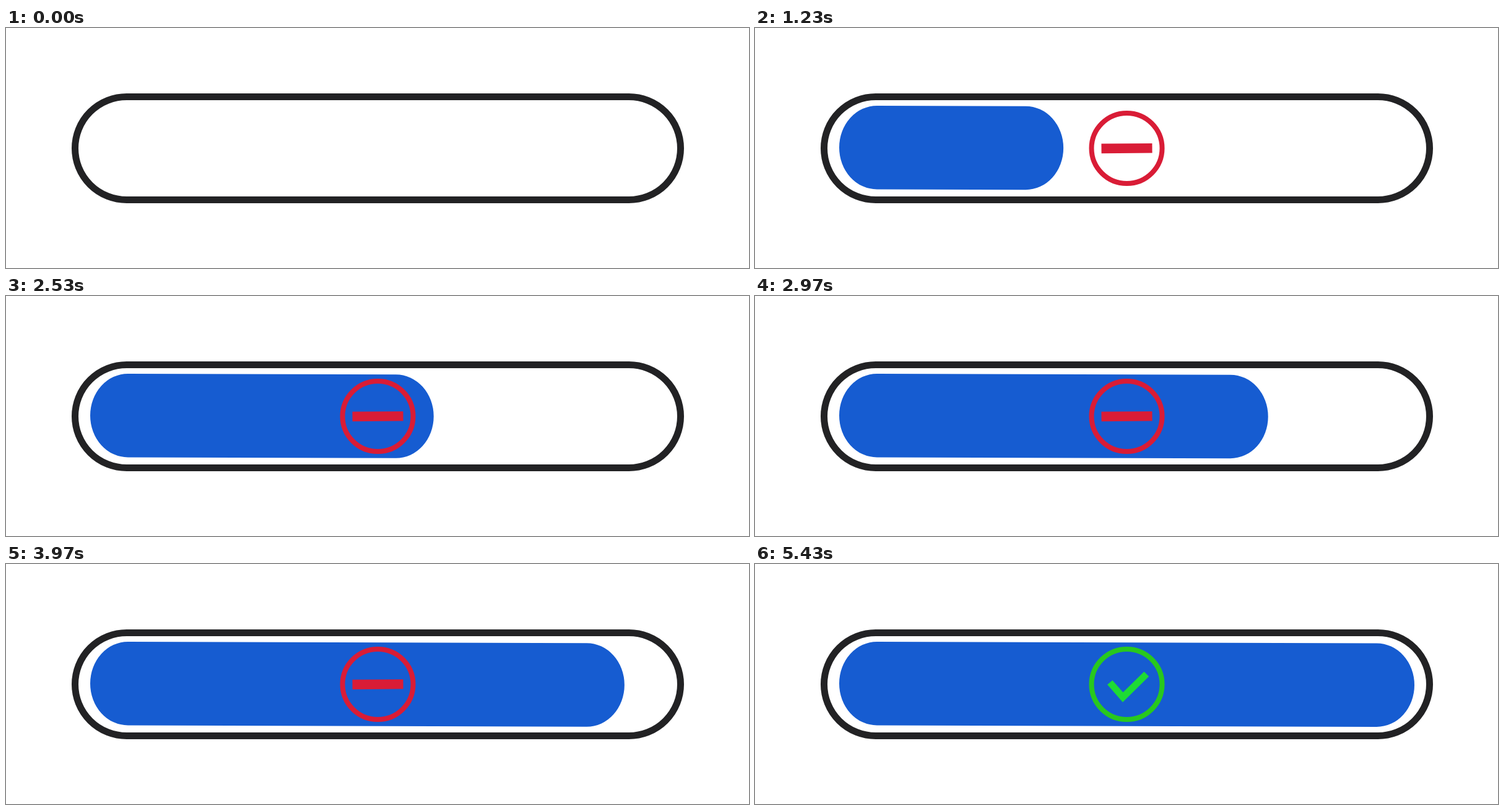
Recreate the animation shown at these times as an HTML page with a canvas. Size 1200 px wide and 389 px high, loop 5.73 s.

```html
<!DOCTYPE html>
<html lang="en">
<head>
<meta charset="utf-8">
<title>Progress bar</title>
<style>
  html, body { margin: 0; width: 100%; height: 100%; overflow: hidden; background: #fff; }
  canvas { display: block; width: 1200px; height: 389px; }
</style>
</head>
<body>
<canvas id="stage" width="1200" height="389"></canvas>
<script>
const ctx = document.getElementById('stage').getContext('2d');
const LOOP = 5730, STEP = 100 / 3, LAST = 163;
const DARK = '#222224', BLUE = '#165cd1', RED = '#d91c36';
const GREEN = '#28c81e', CHECK = '#1edb34';

// Right edge of the fill: time, x, speed in px per ms
const KNOTS = [
  [33, 258, 0.21], [1230, 497.5, 0.19], [1975, 572, 0], [3265, 869, 0], [4415, 1065, 0]
];

const clamp = v => Math.min(1, Math.max(0, v));
const smooth = u => u * u * (3 - 2 * u);

function fillEdge(t) {
  for (let i = 1; i < KNOTS.length; i++) {
    const [t0, x0, v0] = KNOTS[i - 1], [t1, x1, v1] = KNOTS[i];
    if (t > t1) continue;
    const d = t1 - t0, u = clamp((t - t0) / d), w = 1 - u, s = smooth(u);
    return x0 + (x1 - x0) * s + d * (v0 * u * w * w - v1 * u * u * w);
  }
  return KNOTS[KNOTS.length - 1][1];
}

function drawFrame() {
  ctx.beginPath();
  ctx.roundRect(111.5, 111.5, 978, 167, 83.5);
  ctx.strokeStyle = DARK;
  ctx.lineWidth = 11;
  ctx.stroke();
}

function drawFill(edge) {
  const rx = 61, ry = 67.8, left = 197, right = edge - rx, y = 193.7;
  const drop = (right - left) * 0.0031;
  ctx.beginPath();
  ctx.ellipse(left, y, rx, ry, 0, Math.PI / 2, Math.PI * 1.5);
  ctx.ellipse(right, y + drop, rx, ry, 0, -Math.PI / 2, Math.PI / 2);
  ctx.closePath();
  ctx.fillStyle = BLUE;
  ctx.fill();
}

function drawRing(color, part) {
  if (part <= 0) return;
  ctx.beginPath();
  ctx.arc(600.5, 195, 57, -Math.PI / 2, -Math.PI / 2 + Math.PI * 2 * part);
  ctx.strokeStyle = color;
  ctx.lineWidth = 8;
  ctx.stroke();
}

// Strokes the first part of a polyline
function drawLine(points, part, color, width) {
  if (part <= 0) return;
  const legs = points.slice(1).map((p, i) => Math.hypot(p[0] - points[i][0], p[1] - points[i][1]));
  let rest = part * legs.reduce((a, b) => a + b);
  ctx.beginPath();
  ctx.moveTo(...points[0]);
  for (let i = 0; i < legs.length && rest > 0; i++) {
    const k = Math.min(1, rest / legs[i]), [x, y] = points[i], [nx, ny] = points[i + 1];
    ctx.lineTo(x + (nx - x) * k, y + (ny - y) * k);
    rest -= legs[i];
  }
  ctx.strokeStyle = color;
  ctx.lineWidth = width;
  ctx.stroke();
}

function drawMinus(u) {
  drawRing(RED, u ** 3);
  drawLine([[559.5, 195.4], [641.5, 194.7]], smooth(clamp(u * 1.5)), RED, 15.6);
}

function drawCheck(u) {
  drawRing(GREEN, u ** 3);
  drawLine([[573.2, 192], [594.2, 216], [632.3, 178.3]], smooth(clamp(u * 1.5)), CHECK, 11);
}

function draw(time) {
  const k = Math.min(LAST, Math.floor(time / STEP + 0.12));
  const t = k * STEP;
  ctx.fillStyle = '#fff';
  ctx.fillRect(0, 0, 1200, 389);
  drawFrame();
  if (k < 1) return;
  drawFill(fillEdge(t));
  if (t < 4834) drawMinus(Math.min(clamp((t - 33.3) / 600), clamp((4833.3 - t) / 400)));
  drawCheck(k === LAST ? 1 : clamp((t - 4833.3) / 600));
}

let start = null;
function tick(now) {
  if (start === null) start = now;
  draw((now - start) % LOOP);
  requestAnimationFrame(tick);
}
draw(0);
requestAnimationFrame(tick);
</script>
</body>
</html>
```
